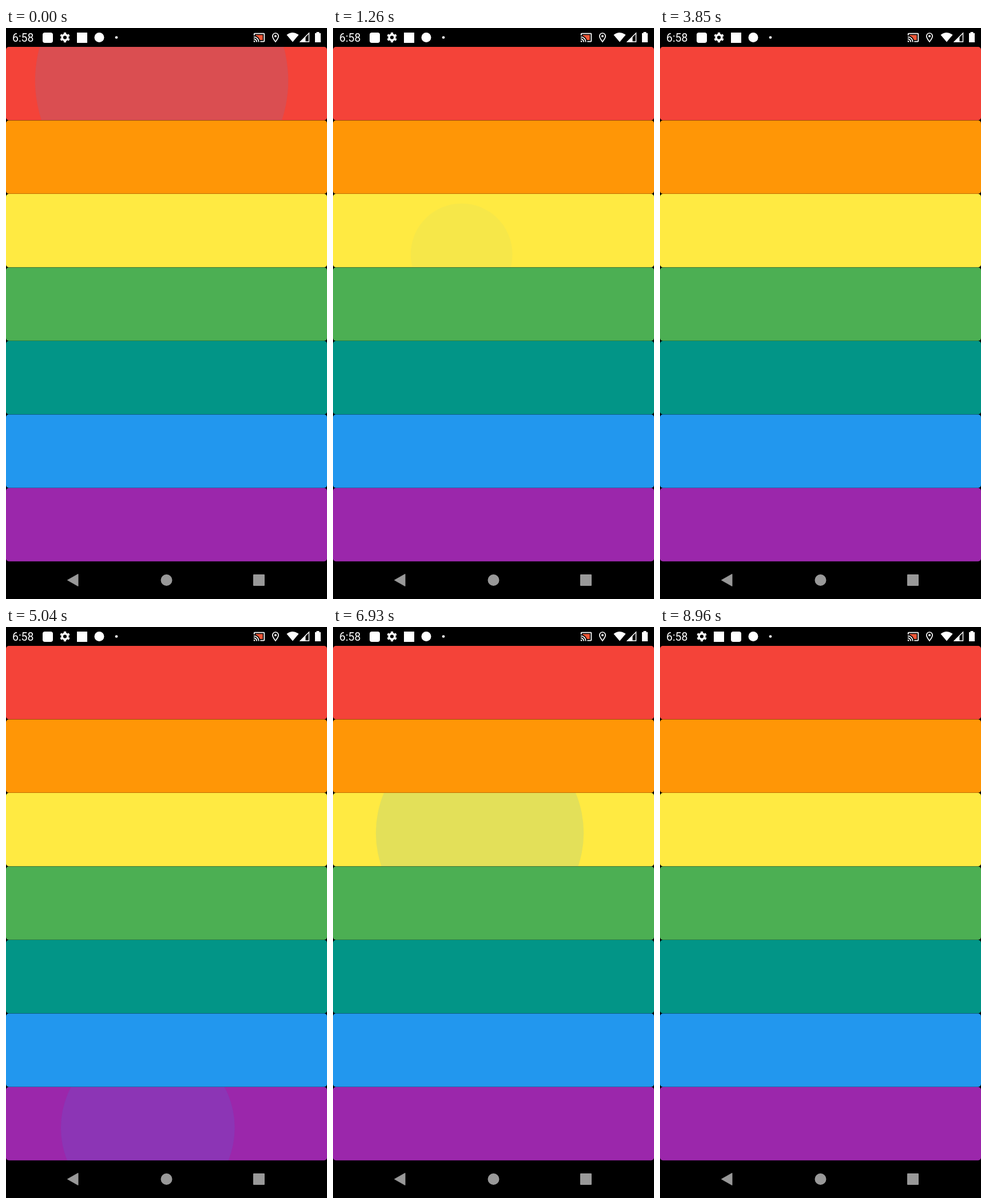
Write an HTML page that moves like this. It is 561 px wide and 998 px high and loops after 9100 ms.

```html
<!DOCTYPE html>
<html lang="en">
<head>
<meta charset="utf-8">
<title>Colour bands</title>
<style>
  html, body { margin: 0; width: 100%; height: 100%; overflow: hidden; background: #000; }
  svg { display: block; width: 100vw; height: 100vh; }
  text { font: 19.4px Roboto, sans-serif; fill: #fff; }
</style>
</head>
<body>
<svg viewBox="0 0 561 998">
  <defs id="clips"></defs>
  <g id="bands"></g>

  <g fill="#fff">
    <text x="11" y="24">6:58</text>
    <rect id="note" y="8" width="18" height="18" rx="4"/>
    <g id="gear" fill="none" stroke="#fff">
      <circle r="4.9" stroke-width="3.6"/>
      <circle r="7.5" stroke-width="2.6" pathLength="60" stroke-dasharray="5 5"
        stroke-dashoffset="2.5" transform="rotate(30)"/>
    </g>
    <rect id="mail" y="8" width="18" height="18"/>
    <circle cx="163" cy="16.5" r="8.5"/>
    <circle cx="193" cy="16.5" r="2.3"/>

    <g transform="translate(432 6) scale(.88)">
      <path fill="#ee5838" d="M5 7v1.6c4 1.3 7.1 4.4 8.4 8.4H19V7z"/>
      <path d="M1 18v3h3c0-1.7-1.3-3-3-3zm0-4v2c2.8 0 5 2.2 5 5h2c0-3.9-3.1-7-7-7zm0-4v2c5 0 9 4 9 9h2c0-6.1-4.9-11-11-11zm20-7H3c-1.1 0-2 .9-2 2v3h2V5h18v14h-7v2h7c1.1 0 2-.9 2-2V5c0-1.1-.9-2-2-2z"/>
    </g>
    <path d="M471 24c-3-4-5.2-6.700-5.200-9.800a5.200 5.200 0 0 1 10.400 0c0 3.100-2.200 5.800-5.200 9.800z"
      fill="none" stroke="#fff" stroke-width="1.700"/>
    <circle cx="471" cy="14.200" r="2"/>
    <path d="M501 24.500L490.500 12q10.500-8 21 0z"/>
    <path d="M514.500 24L529.500 9v15z" fill="none" stroke="#fff" stroke-width="1.500"/>
    <path d="M513.500 24.500l10-10v10z"/>
    <path d="M542.500 9v-2h5v2h2.500v16h-10v-16z"/>
  </g>

  <g fill="#999">
    <path d="M107.500 965L126 954.500v21z" stroke="#999" stroke-linejoin="round"/>
    <circle cx="280.500" cy="965" r="10"/>
    <rect x="432" y="955" width="20" height="20" rx="1"/>
  </g>
</svg>
<script>
const LOOP = 9100, STEP = 70, TOP = 33, W = 561, H = 899.5 / 7;
const HOLD = 80, GROW = 225, FADE = 150, FADE_IN = 75;
const REACH = Math.hypot(W, H) / 2;
const ICON_SWAP = 8610;
const COLORS = ['#f44339', '#ff9606', '#ffea42', '#4caf53', '#029587', '#2297ee', '#9b27ab'];

// [start ms, band, x, y inside the band]
const TAPS = [
  [-150, 0, 255, 48], [540, 1, 235, 75], [1236, 2, 224, 106], [1937, 3, 229, 73],
  [2630, 4, 230, 75], [3290, 5, 230, 75], [4030, 6, 230, 75],
  [4930, 6, 232, 75], [5400, 5, 232, 75], [5872, 4, 234, 82], [6340, 3, 235, 75],
  [6805, 2, 235, 75], [7275, 1, 235, 75], [7745, 0, 240, 75]
];

const byId = id => document.getElementById(id);
const clamp = v => Math.max(0, Math.min(1, v));
const mix = (a, b, k) => a + (b - a) * k;

function add(parent, tag, attrs) {
  const el = document.createElementNS(parent.namespaceURI, tag);
  for (const k in attrs) el.setAttribute(k, attrs[k]);
  return parent.appendChild(el);
}

function bezier(a, b, u) {
  const v = 1 - u;
  return 3 * v * v * u * a + 3 * v * u * u * b + u * u * u;
}

// cubic-bezier(.25, .1, .25, 1)
function ease(x) {
  let lo = 0, hi = 1;
  for (let i = 0; i < 20; i++) {
    const mid = (lo + hi) / 2;
    if (bezier(.25, .25, mid) < x) lo = mid; else hi = mid;
  }
  return bezier(.1, 1, lo);
}

const ripples = COLORS.map((fill, i) => {
  const box = { x: 0, y: TOP + i * H, width: W, height: H - .3, rx: 5 };
  add(add(byId('clips'), 'clipPath', { id: 'band' + i }), 'rect', box);
  add(byId('bands'), 'rect', { ...box, fill });
  const g = add(byId('bands'), 'g', { 'clip-path': `url(#band${i})` });
  return add(g, 'circle', { fill: '#2196f3', opacity: 0 });
});

function drawTap(t, [start, band, x, y]) {
  const age = t - start, since = age - HOLD;
  if (age < 0 || since > GROW + FADE) return;
  // slow growth while pressed, fast after release
  const k = ease(clamp(Math.min(age, HOLD) / 1000 + Math.max(0, since) / GROW));
  const alpha = .125 * clamp(age / FADE_IN) * (1 - clamp((since - GROW) / FADE));
  const el = ripples[band];
  el.setAttribute('cx', mix(x, W / 2, k));
  el.setAttribute('cy', TOP + band * H + mix(y, H / 2, k));
  el.setAttribute('r', REACH * mix(.3, 1, k));
  el.setAttribute('opacity', alpha);
}

function draw(t) {
  for (const el of ripples) el.setAttribute('opacity', 0);
  for (const tap of TAPS) drawTap(t, tap);
  const swapped = t >= ICON_SWAP;
  byId('note').setAttribute('x', swapped ? 124 : 64);
  byId('gear').setAttribute('transform', `translate(${swapped ? 73 : 103} 16.5)`);
  byId('mail').setAttribute('x', swapped ? 94 : 124);
}

const begin = performance.now();
function tick() {
  const t = (performance.now() - begin) % LOOP;
  draw(Math.floor(t / STEP) * STEP);
  requestAnimationFrame(tick);
}
tick();
</script>
</body>
</html>
```
